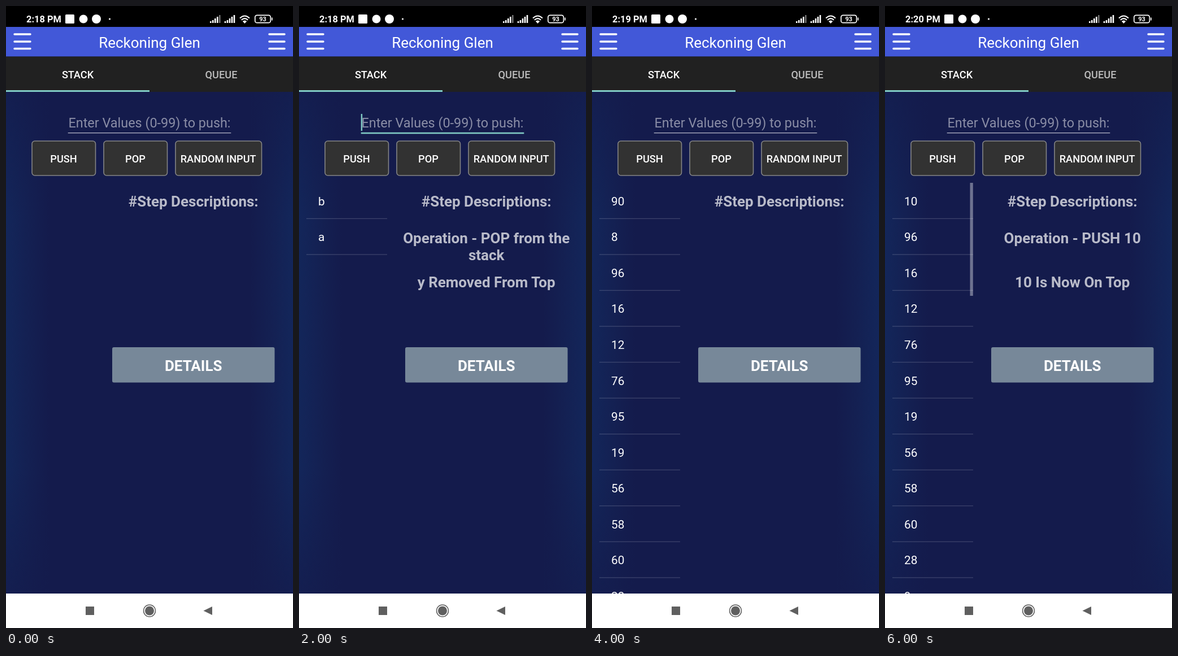
Recreate the animation shown at these times as an HTML page. Size 508 by 1101 pixels, loop 6500 ms.

```html
<!DOCTYPE html>
<html lang="en">
<head>
<meta charset="utf-8">
<title>Stack demo</title>
<style>
  html, body { margin: 0; width: 100%; height: 100%; overflow: hidden; background: #141b4c; }
  svg { display: block; font-family: Roboto, sans-serif; fill: #fff; }
  .mid { text-anchor: middle; }
  .title { font-size: 26px; }
  .label { font-size: 18.2px; font-weight: 500; }
  .bold { font-size: 26px; font-weight: 700; }
  .soft { fill-opacity: .7; }
  .field { font-size: 23.4px; }
  .item { font-size: 20.8px; }
  .clock { font-size: 16.4px; font-weight: 700; }
  .button { fill: #323232; stroke: #858585; stroke-width: 1.6; }
</style>
</head>
<body>
<svg width="508" height="1101" viewBox="0 0 508 1101">
  <defs>
    <linearGradient id="sides">
      <stop offset="0" stop-color="#13265a"/>
      <stop offset=".08" stop-color="#142052"/>
      <stop offset=".15" stop-color="#141b4c"/>
      <stop offset=".85" stop-color="#141b4c"/>
      <stop offset=".92" stop-color="#142052"/>
      <stop offset="1" stop-color="#13265a"/>
    </linearGradient>
    <linearGradient id="ends" x2="0" y2="1">
      <stop offset="0" stop-color="#141b4c" stop-opacity=".7"/>
      <stop offset=".25" stop-color="#141b4c" stop-opacity="0"/>
      <stop offset=".75" stop-color="#141b4c" stop-opacity="0"/>
      <stop offset="1" stop-color="#141b4c" stop-opacity=".7"/>
    </linearGradient>
    <clipPath id="page"><path d="M0 152H508V1040H0z"/></clipPath>
  </defs>

  <rect y="152" width="508" height="888" fill="url(#sides)"/>
  <rect y="152" width="508" height="888" fill="url(#ends)"/>

  <!-- status bar -->
  <rect width="508" height="37" fill="#000"/>
  <rect x="105" y="15" width="16" height="16" rx="1.5"/>
  <circle cx="137" cy="23" r="7.5"/>
  <circle cx="160" cy="23" r="8"/>
  <circle cx="183.500" cy="23" r="1.600"/>
  <g id="signal" fill="none" stroke="#fff" stroke-width="2.6"></g>
  <g fill="none" stroke="#fff" stroke-width="2">
    <path d="M414 21.500Q422.500 13.500 431 21.500M416.800 24.700Q422.500 19.500 428.200 24.700"/>
    <rect x="440.800" y="16.300" width="27.500" height="13.400" rx="3.500" stroke-width="1.700"/>
  </g>
  <path d="M418.800 27Q422.500 24 426.200 27L422.500 31zM470 20.500h1.700v5h-1.700z"/>
  <text class="mid" x="454.500" y="27" font-size="11" font-weight="700">93</text>

  <!-- header and tabs -->
  <rect y="37" width="508" height="52.500" fill="#4258d8"/>
  <path d="M15 50H43M15 63H43M15 75.500H43M466 50H493M466 63H493M466 75.500H493"
        stroke="#fff" stroke-width="3.400" stroke-linecap="round"/>
  <text class="mid title" x="254" y="73.500">Reckoning Glen</text>
  <rect y="89.500" width="508" height="62.500" fill="#212121"/>
  <rect y="149" width="254" height="3" fill="#80cbc4"/>
  <text class="mid label" x="127" y="127.500">STACK</text>
  <text class="mid label soft" x="381" y="127.500">QUEUE</text>

  <!-- buttons -->
  <g class="button">
    <rect x="46" y="239" width="112.500" height="61" rx="5"/>
    <rect x="173" y="239" width="112.500" height="61" rx="5"/>
    <rect x="300" y="239" width="152.500" height="61" rx="5"/>
  </g>
  <text class="mid label" x="102" y="276.500">PUSH</text>
  <text class="mid label" x="229" y="276.500">POP</text>
  <text class="mid label" x="375.700" y="276.500">RANDOM INPUT</text>
  <rect x="188" y="604" width="287.500" height="62.500" rx="3" fill="#778899"/>
  <text class="mid bold" x="331.700" y="645.500">DETAILS</text>
  <text class="mid bold soft" x="331.700" y="354.500">#Step Descriptions:</text>

  <g id="live" clip-path="url(#page)"></g>
  <text id="clock" class="clock" x="36" y="29"></text>

  <!-- navigation bar -->
  <rect y="1040" width="508" height="61"/>
  <g fill="#5f5f5f">
    <rect x="141" y="1063" width="15" height="15"/>
    <circle cx="254" cy="1070.500" r="8"/>
    <circle cx="254" cy="1070.500" r="10.500" fill="none" stroke="#5f5f5f" stroke-width="1.500"/>
    <path d="M349.500 1070.500L365 1063V1078z"/>
  </g>
</svg>
<script>
const STEP = 500, ROW = 63.55;
const byId = id => document.getElementById(id);
const numbers = [90, 8, 96, 16, 12, 76, 95, 19, 56, 58, 60, 28, 9, 68];

const push = v => ['Operation - PUSH ' + v, '', v + ' Is Now On Top'];
const pop = v => ['Operation - POP from the', 'stack', v + ' Removed From Top'];
const state = (minute, items, notes = [], extra = {}) => ({ minute, items, notes, ...extra });
const focus = { focused: true }, scroll = { scrollbar: true };

const states = [
  state(18, []),
  state(18, ['a'], push('a'), focus),
  state(18, ['b', 'a'], push('b'), focus),
  state(18, ['y', 'b', 'a'], push('y'), focus),
  state(18, ['b', 'a'], pop('y'), focus),
  state(18, ['a'], pop('b'), focus),
  state(18, [], pop('a'), focus),
  state(19, [], pop('a'), focus),
  state(19, numbers),
  state(19, numbers.slice(1), pop(90), scroll),
  state(19, numbers.slice(2), pop(8), scroll),
  state(20, numbers.slice(2), pop(8), { value: 10 }),
  state(20, [10, ...numbers.slice(2)], push(10), scroll),
];

const text = (cls, x, y, s) => `<text class="${cls}" x="${x}" y="${y}">${s}</text>`;
const rect = (x, y, w, h, fill) =>
  `<rect x="${x}" y="${y}" width="${w}" height="${h}" fill="${fill}"/>`;

function field({ focused, value }) {
  const content = value
    ? text('mid field', 254, 215, value)
    : `<g opacity=".5">${text('mid field', 254, 215, 'Enter Values (0-99) to push:')}</g>`;
  return content + (focused
    ? rect(109.7, 223.7, 288.6, 2.6, '#80cbc4') + rect(109.7, 191, 2.4, 30, '#80cbc4')
    : rect(109.7, 224, 288.6, 1.3, '#b2b4c5'));
}

function list({ items, scrollbar }) {
  return items.map((v, i) =>
    text('item', 34, 352.8 + i * ROW, v) +
    rect(13, 375.7 + i * ROW, 143, 1.3, 'rgba(255,255,255,.17)')).join('') +
    (scrollbar ? rect(150.5, 313, 5.3, 200, 'rgba(255,255,255,.38)') : '');
}

function show(s) {
  byId('clock').textContent = `2:${s.minute} PM`;
  byId('live').innerHTML = field(s) + list(s) +
    s.notes.map((n, i) => text('mid bold soft', 331.7, [419.5, 449.5, 497.5][i], n)).join('');
}

byId('signal').innerHTML = [362.3, 388].map((x, k) =>
  [3, 5, 8, 11, 14].map((h, i) =>
    `<path d="M${x + i * 4} 30v${-h}" opacity="${k === 0 && i === 4 ? .45 : 1}"/>`).join('')).join('');

let shown = -1;
function tick() {
  const index = Math.floor(performance.now() / STEP) % states.length;
  if (index !== shown) show(states[shown = index]);
  requestAnimationFrame(tick);
}
tick();
</script>
</body>
</html>
```
